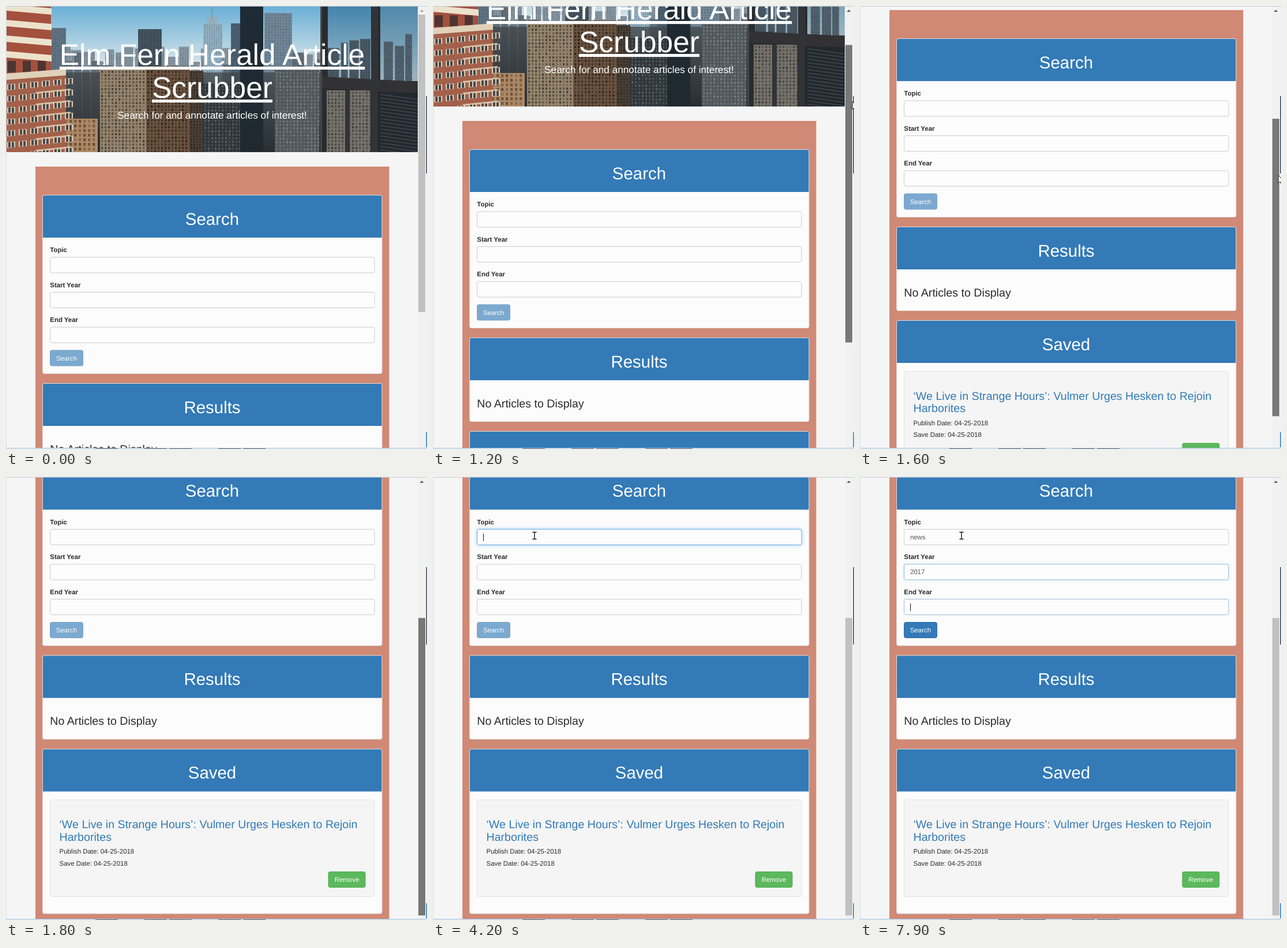
Animation, 730 px wide and 767 px high, one loop 8000 ms. Source, as an HTML page with a canvas:

```html
<!DOCTYPE html>
<html lang="en">
<head>
<meta charset="utf-8">
<title>Article Scrubber</title>
<style>
html, body { margin: 0; width: 100%; height: 100%; overflow: hidden; background: #f5f5f6; }
#stage { position: relative; width: 730px; height: 767px; overflow: hidden; }
#page, #frame, #photo, #doc { position: absolute; left: 0; top: 0; }
text { font-family: "Liberation Sans", Arial, sans-serif; font-size: 11.45px; fill: #2b2b2b; text-rendering: geometricPrecision; white-space: pre; }
.mid { text-anchor: middle; }
.title { font-size: 51.5px; fill: #fff; text-decoration: underline; }
.lead { font-size: 17.2px; fill: #fff; }
.head { font-size: 29.45px; fill: #fff; }
.sub { font-size: 19.64px; }
.link { fill: #337ab7; }
.label { font-weight: bold; }
.typed { fill: #555; }
.btn { fill: #fff; }
</style>
</head>
<body>
<div id="stage">
  <div id="page">
    <canvas id="photo" width="714" height="253"></canvas>
    <svg id="doc" width="730" height="1200"></svg>
  </div>
  <svg id="frame" width="730" height="767"></svg>
</div>
<script>
const $ = id => document.getElementById(id);
const page = $('page'), doc = $('doc'), frame = $('frame');

function add(parent, tag, attrs, text) {
  const el = document.createElementNS('http://www.w3.org/2000/svg', tag);
  set(el, attrs);
  if (text) el.textContent = text;
  parent.appendChild(el);
  return el;
}
function set(el, attrs) {
  for (const k in attrs) el.setAttribute(k, attrs[k]);
}
const rect = (parent, x, y, width, height, fill, more) =>
  add(parent, 'rect', { x, y, width, height, fill, ...more });
const label = (x, y, cls, text) => add(doc, 'text', { x, y, class: cls }, text);

// Skyline photo as flat shapes
function drawPhoto() {
  const c = $('photo').getContext('2d');
  let seed = 7;
  const rnd = () => (seed = seed * 16807 % 2147483647) / 2147483647;
  const box = (x, y, w, h, color) => { c.fillStyle = color; c.fillRect(x, y, w, h); };
  const fade = (x, y, w, h, a, b) => {
    const g = c.createLinearGradient(0, y, 0, y + h);
    g.addColorStop(0, a);
    g.addColorStop(1, b);
    box(x, y, w, h, g);
  };
  // a beam from (x, y) dropping by `drop` over its width
  const slant = (x, y, w, h, drop, color) => {
    c.save();
    c.transform(1, drop / w, 0, 1, x, y);
    box(0, 0, w, h, color);
    c.restore();
  };
  const tower = (x, y, w, color, win, pitch = 5, bottom = 253) => {
    box(x, y, w, bottom - y, color);
    for (let j = y + 2; j < bottom; j += pitch)
      for (let i = x + 2; i < x + w - 1; i += pitch) {
        c.globalAlpha = 0.3 + 0.6 * rnd();
        box(i, j, pitch * 0.55, pitch * 0.65, win);
      }
    c.globalAlpha = 1;
  };
  const skyline = (from, to, top, spread, color, win, bottom) => {
    for (let x = from; x < to - 8;) {
      const w = Math.min(11 + rnd() * 11, to - x);
      tower(x, top + rnd() * spread, w, color, win, 4, bottom);
      x += w + rnd() * 4;
    }
  };

  fade(0, 0, 714, 95, '#69afd6', '#d0e1e8');
  skyline(80, 545, 62, 35, '#8797a2', '#64737e');
  skyline(78, 545, 80, 45, '#66737c', '#44515b');
  tower(78, 38, 26, '#627482', '#4a5c6a', 4);
  tower(229, 40, 41, '#46545f', '#33414c', 4);
  tower(342, 30, 33, '#95b0c0', '#688699', 4);
  slant(349, 19, 17, 12, 0, '#94adbb');
  slant(356, 0, 2, 22, 0, '#8597a2');
  tower(390, 30, 17, '#4c6172', '#3a4d5c', 4);
  tower(448, 12, 48, '#718798', '#566c7d', 5);
  fade(100, 115, 445, 138, 'rgba(64,70,74,.75)', '#282d31');
  tower(163, 110, 80, '#97866e', '#3b352e', 6);
  tower(243, 104, 75, '#6b533f', '#27201b', 6);
  tower(318, 112, 24, '#4b4036', '#24211e');
  tower(342, 135, 66, '#2f363a', '#5d6467', 6);
  tower(466, 106, 77, '#50575b', '#7c8182', 6);
  fade(406, 0, 40, 253, '#1d2b36', '#20292f');
  tower(100, 195, 59, '#b08a66', '#5d4736', 8);

  // brick blocks on the left
  box(0, 0, 78, 130, '#a4503e');
  for (let y = -3; y < 90; y += 27) slant(0, y, 79, 11, 7, '#ece2cc');
  for (let x = 3; x < 76; x += 26) box(x, 95, 14, 20, '#4d3531');
  slant(0, 122, 104, 140, -10, '#a3604a');
  slant(0, 117, 104, 11, -8, '#e0d1b9');
  for (let row = 0; row < 7; row++) {
    const y = 136 + row * 20;
    for (let x = 2; x < 104; x += 20) {
      slant(x, y - x * 0.1, 14, 10, -1, '#ddd0bd');
      box(x + 2, y - x * 0.1, 4, 9, '#4b4846');
      box(x + 8, y - x * 0.1, 4, 9, '#4b4846');
    }
    slant(52, y + 13, 60, 3, -6, '#d9c2a4');
  }

  // window frame and reflections on the right
  box(545, 0, 169, 253, '#292b2e');
  fade(558, 0, 75, 128, '#4384ac', '#a5bfcc');
  fade(649, 0, 65, 130, '#4f88ab', '#9db4bf');
  skyline(558, 633, 45, 35, '#4b5a65', '#36434d', 128);
  skyline(655, 714, 42, 35, '#536470', '#3a4852', 130);
  tower(556, 146, 76, '#77736a', '#34383a', 6);
  box(588, 146, 8, 107, '#303437');
  slant(545, 122, 169, 20, 9, '#323234');
  box(634, 0, 11, 253, '#323336');
  box(645, 150, 69, 103, '#23282d');
  for (let y = 152; y < 253; y += 6) slant(649, y, 65, 2, 9, '#39424a');
  box(545, 0, 3, 253, '#45464a');
}

function panel(y, h, title) {
  rect(doc, 63.5, y, 588.5, h, '#fcfcfc', { rx: 3, stroke: '#ddd' });
  add(doc, 'path', { d: `M64 ${y + 73.5}V${y + 3}q0-2.5 2.5-2.5H649q2.5 0 2.5 2.5V${y + 73.5}z`, fill: '#337ab7' });
  label(357.5, y + 51, 'head mid', title);
}
function button(x, y, w, text, fill, stroke) {
  const b = rect(doc, x, y, w, 27, fill, { rx: 3, stroke });
  label(x + w / 2, y + 17.5, 'btn mid', text);
  return b;
}

drawPhoto();
rect(doc, 0, 253, 715, 947, '#f5f5f6');
rect(doc, 51, 278, 613.5, 922, '#d08975');
label(357.5, 102, 'title mid', 'Elm Fern Herald Article');
label(357.5, 159, 'title mid', 'Scrubber');
label(357.5, 195, 'lead mid', 'Search for and annotate articles of interest!');

panel(327.5, 309, 'Search');
const fields = [
  { name: 'Topic', word: 'news', from: 4100, to: 6100, type: 5000, pace: 200 },
  { name: 'Start Year', word: '2017', from: 6100, to: 7900, type: 6600, pace: 266 },
  { name: 'End Year', word: '', from: 7900, to: 9900, type: 9900, pace: 200 }
];
fields.forEach((f, i) => {
  f.y = 435 + i * 60.5;
  label(76.3, f.y - 9, 'label', f.name);
  f.box = rect(doc, 76.5, f.y, 562.5, 27, '#fdfdfd', { rx: 3 });
  f.text = label(86.9, f.y + 17.3, 'typed', '');
});
const caret = rect(doc, 0, 0, 1, 13, '#111');
const submit = button(76.5, 596, 57, 'Search');

panel(653.5, 145, 'Results');
label(76.3, 773.5, 'sub', 'No Articles to Display');

panel(815.5, 285, 'Saved');
rect(doc, 76.5, 903.5, 562.5, 167.5, '#f5f5f5', { rx: 3, stroke: '#e1e3e1' });
label(92.5, 952.5, 'sub link', '‘We Live in Strange Hours’: Vulmer Urges Hesken to Rejoin');
label(92.5, 974, 'sub link', 'Harborites');
label(92.5, 996.5, '', 'Publish Date: 04-25-2018');
label(92.5, 1017, '', 'Save Date: 04-25-2018');
button(559, 1028, 64, 'Remove', '#5cb85c', '#4cae4c');

// browser edges and scrollbar
rect(frame, 714.5, 0, 13, 767, '#f1f1f2');
const thumb = rect(frame, 715, 0, 12, 515);
const up = add(frame, 'path', { d: 'M717.5 10h7l-3.5-3.5z' });
rect(frame, 727.5, 0, 2.5, 767, '#eef1f5');
rect(frame, 728.7, 156, 1.3, 134, '#1d2a42');
rect(frame, 728.5, 738, 1.5, 26, '#2a78bd');
rect(frame, 0, 0, 1, 767, '#d3dae6');
rect(frame, 0, 0, 730, 1, '#c3c9d3');
rect(frame, 0, 765, 730, 1, '#a9c3dc');
rect(frame, 0, 766, 730, 1, '#e3ebf3');
for (const x of [155, 240, 283, 368, 411]) rect(frame, x, 766, 39, 1, '#6b6f76');
const arrow = add(frame, 'path', { d: 'M0 0v13.5l3.1-2.9 2 4.8 2.1-.9-2-4.7h4.3z', fill: '#fff', stroke: '#111', 'stroke-width': 0.9 });
const beam = add(frame, 'path', { d: 'M172.5 95.5h2.5l1 1 1-1h2.5M176 96.5v10M172.5 107.5h2.5l1-1 1 1h2.5', fill: 'none', stroke: '#111', 'stroke-width': 1.3 });

const clamp = v => Math.max(0, Math.min(1, v));
const mix = (a, b, k) => a + (b - a) * k;

// straight motion through key points [time, value]
function along(keys, t) {
  const i = keys.findIndex(k => k[0] > t);
  if (i < 0) return keys.at(-1)[1];
  if (i === 0) return keys[0][1];
  const [a, b] = [keys[i - 1], keys[i]];
  return mix(a[1], b[1], (t - a[0]) / (b[0] - a[0]));
}
const scrollKeys = [[900, 0], [1000, 12], [1200, 79], [1400, 185.5], [1600, 271], [1800, 344.5]];
const leaveX = [[1900, 720], [2400, 720], [3000, 728], [3300, 649], [3700, 176]];
const leaveY = [[1900, 383], [2400, 383], [3000, 320], [3300, 250], [3700, 101]];

function thumbColor(t) {
  if (t < 200 || t >= 3400) return '#c1c1c1';
  return t < 300 || t >= 3300 ? '#a8a8a8' : '#787878';
}

function placePointer(t, scroll) {
  const dragging = t < 1800;
  const x = dragging ? 728 - scroll * 0.01 : along(leaveX, t);
  const y = dragging ? 113 + scroll * 0.665 : along(leaveY, t);
  set(arrow, { transform: `translate(${x} ${y})` });
  arrow.style.display = t >= 200 && t < 3700 && Math.floor(t / 100) !== 18 ? '' : 'none';
  beam.style.display = t >= 3700 ? '' : 'none';
}

function drawField(f, t) {
  const count = Math.max(0, Math.floor((t - f.type) / f.pace) + 1);
  f.text.textContent = f.word.slice(0, count);
  const k = clamp((t - f.from + 60) / 150 * (t >= f.from)) - clamp((t - f.to + 60) / 150 * (t >= f.to));
  const rgb = [102, 175, 233].map(v => Math.round(mix(204, v, k)));
  set(f.box, { stroke: `rgb(${rgb})` });
  f.box.style.filter = k > 0 ? `drop-shadow(0 0 3px rgba(102,175,233,${0.6 * k * k}))` : 'none';

  if (t < f.from || t >= f.to) return;
  const visible = t - f.from < 400 || count > 0;
  const x = visible ? 86.6 + f.text.getComputedTextLength() : -9;
  set(caret, { x: Math.round(x), y: f.y + 7.5 });
}

function draw(now) {
  const t = Math.floor(now % 8000 / 100) * 100;
  const scroll = along(scrollKeys, t);
  page.style.transform = `translateY(${-scroll}px)`;
  set(thumb, { y: 15 + scroll * 0.665, fill: thumbColor(t) });
  set(up, { fill: scroll ? '#505050' : '#a3a3a3' });
  placePointer(t, scroll);

  set(caret, { x: -9 });
  for (const f of fields) drawField(f, t);
  const ready = t >= fields[0].type;
  set(submit, { fill: ready ? '#337ab7' : '#7ba9d0', stroke: ready ? '#2e6da4' : '#78a2c6' });
}

const start = performance.now();
function loop() {
  draw(performance.now() - start);
  requestAnimationFrame(loop);
}
loop();
</script>
</body>
</html>
```
